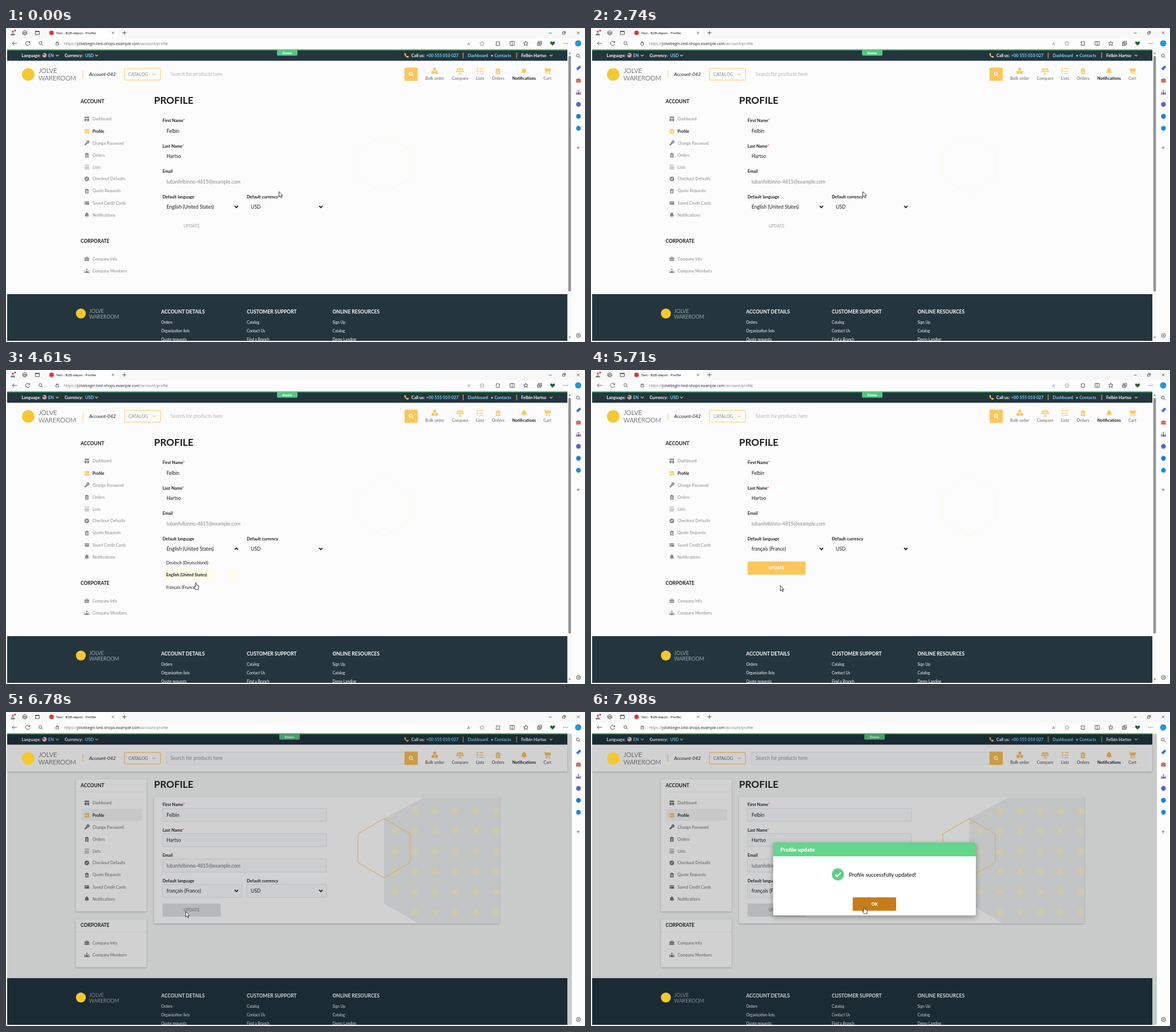
These frames come from a looping animation (1017x551 px, 8000 ms). An HTML page:

```html
<!DOCTYPE html>
<html lang="en">
<head>
<meta charset="utf-8">
<title>Profile</title>
<style>
html, body { margin: 0; width: 100%; height: 100%; overflow: hidden; background: #fdfdfd; }
svg {
  display: block; width: 100%; height: 100%;
  font-family: Lato, "Open Sans", sans-serif;
  --page: #fcfcfd; --bar: #24353e; --gold: #fdc65c; --ink: #1b1c1f; --mute: #88898b;
  --faint: #b4b5b8; --lit: #fff; --cyan: #80d4fb; --demo: #58c584; --line: #45b05c; --hex: #fdf9e6;
}
svg.dim {
  --page: #c9caca; --bar: #1b2b34; --gold: #cd9b42; --ink: #1c1d20; --mute: #5b5c5e;
  --faint: #77787a; --lit: #d4d6d6; --cyan: #67b0d2; --demo: #489e69; --line: #378c4a; --hex: #d3ad6c;
}
.page { fill: var(--page); } .bar { fill: var(--bar); } .gold { fill: var(--gold); }
.ink { fill: var(--ink); } .mute { fill: var(--mute); } .faint { fill: var(--faint); }
.lit { fill: var(--lit); } .cyan { fill: var(--cyan); } .demo { fill: var(--demo); }
.line { fill: var(--line); } .red { fill: #e0414c; } .white { fill: #fff; }
.goldline { fill: none; stroke: var(--gold); } .inkline { fill: none; stroke: var(--ink); }
.litline { fill: none; stroke: var(--lit); }
.chrome { fill: none; stroke: #333; stroke-width: .8; }
.b { font-weight: 700; } .h { font-weight: 900; } .i { font-style: italic; } .l { font-weight: 300; }
.ui { font-family: "Open Sans", "Noto Sans", sans-serif; }
.mid { text-anchor: middle; }
.shade { display: none; } .dim .shade { display: inline; } .dim .clear { display: none; }
.card { fill: #d1d1d2; filter: drop-shadow(0 1px 1.5px #0004); }
.box { fill: #cdcecf; stroke: #b7b8ba; stroke-width: .8; }
</style>
</head>
<body>
<svg id="stage" viewBox="0 0 1017 551" preserveAspectRatio="none"></svg>
<script>
const stage = document.getElementById('stage');

const text = (x, y, size, cls, s, id = '') =>
  `<text ${id && `id="${id}"`} x="${x}" y="${y}" font-size="${size}" class="${cls}">${s}</text>`;
const rect = (x, y, x2, y2, cls, r = 0, more = '') =>
  `<rect x="${x}" y="${y}" width="${x2 - x}" height="${y2 - y}" rx="${r}" class="${cls}" ${more}/>`;
const dot = (x, y, r, fill) => `<circle cx="${x}" cy="${y}" r="${r}" fill="${fill}"/>`;
const icon = (x, y, d, cls, scale = 1, more = '') =>
  `<path transform="translate(${x} ${y}) scale(${scale})" d="${d}" class="${cls}" fill-rule="evenodd" ${more}/>`;
const group = (id, s, more = '') => `<g id="${id}" ${more}>${s}</g>`;

const shapes = {
  board: 'M-4-4H4V-1.5H-4ZM-4-.5H-.5V4H-4ZM.5-.5H4V4H.5Z',
  badge: 'M-4-3H-2V-4H-1V-3H1V-4H2V-3H4V4H-4ZM-3-1H-1V2H-3ZM0-.5H3V.5H0ZM0 1.5H3V2.4H0Z',
  key: 'M-4 4V2L-.5-1.5A2.6 2.6 0 1 1 1.5.5L-1 3H-2V4ZM1.2-2.5H2.6V-1.2H1.2Z',
  clip: 'M-3-3H-1V-4H1V-3H3V4.4H-3ZM-1.8-1H1.8V-.2H-1.8ZM-1.8.7H1.8V1.5H-1.8ZM-1.8 2.4H1.8V3.2H-1.8Z',
  rows: 'M-4-4H4V-3.2H-4ZM-4-1.6H4V-.8H-4ZM-4 .8H4V1.6H-4ZM-4 3.2H4V4H-4Z',
  check: 'M-4 0A4 4 0 1 1 4 0A4 4 0 1 1-4 0ZM-2.2.1L-.6 1.8 2.4-1.2 1.7-1.9-.6.4-1.5-.6Z',
  credit: 'M-4-3H4V-1.6H-4ZM-4-.7H4V3H-4ZM-3 1.2H-1V2H-3Z',
  bell: 'M-4 2.5Q-2.8 1-2.8-1Q-2.6-3.4-.5-3.7V-4.4H.5V-3.7Q2.6-3.4 2.8-1Q2.8 1 4 2.5ZM-1.2 3.2H1.2L0 4.4Z',
  bag: 'M-4.2-2H-1.8V-3.8H1.8V-2H4.2V.5H-4.2ZM-1-2H1V-3H-1ZM-4.2 1.2H4.2V3.6H-4.2Z',
  people: 'M-1.3-2.4A1.3 1.3 0 1 1 1.3-2.4A1.3 1.3 0 1 1-1.3-2.4ZM-2 3.8V1Q0-1.4 2 1V3.8ZM-4.4 3.8V1.5L-2.6.8V3.8ZM4.4 3.8V1.5L2.6.8V3.8ZM-4-1H-2.5V.2H-4ZM2.5-1H4V.2H2.5Z',
  cubes: 'M-2-4L0-5 2-4V-1.3L0-.3-2-1.3ZM-4.6.4L-2.4-.4-.3.4V3.4L-2.4 4.3-4.6 3.4ZM.3.4L2.4-.4 4.6.4V3.4L2.4 4.3.3 3.4Z',
  scales: 'M0-4.5V4M-2.5 4H2.5M-4-3.2H4M-3.2-3L-5 .8H-1.4ZM3.2-3L1.4 .8H5Z',
  todo: 'M-1-3.5H5M-1 0H5M-1 3.5H5M-5-3.5L-4-2.6-2.5-4.6M-5 0L-4 .9-2.5-1.1M-5 3.3H-3.2',
  cart: 'M-5-4.5H-3.2L-2.9-3.5H5L4 .8H-2L-1.8 1.7H3.8V2.5H-2.5L-3.9-3.7H-5ZM-2 3H-.4V4.6H-2ZM2.2 3H3.8V4.6H2.2Z',
  lens: 'M1.3 1.3L3.8 3.8M-3.2-.6A2.6 2.6 0 1 1 2-.6A2.6 2.6 0 1 1-3.2-.6Z',
  phone: 'M-3.5-3.5L-1.8-4-.8-1.8-1.8-.9Q-1 .9.9 1.8L1.8.8 4 1.8 3.5 3.5Q2.5 4.3.8 3.7-3 1.8-3.8-1.5-4-3-3.5-3.5Z',
  down: 'M-2.4-1.1L0 1.3 2.4-1.1',
  big: 'M-3-1.5L0 1.5 3-1.5',
  plus: 'M-3.5 0H3.5M0-3.5V3.5',
  cross: 'M-2.3-2.3L2.3 2.3M2.3-2.3L-2.3 2.3',
  gear: 'M-3.6 0A3.6 3.6 0 1 1 3.6 0A3.6 3.6 0 1 1-3.6 0ZM-1.3 0A1.3 1.3 0 1 1 1.3 0A1.3 1.3 0 1 1-1.3 0Z',
  star: 'M0-4L1.2-1.2 4-1 1.9.9 2.5 3.8 0 2.2-2.5 3.8-1.9.9-4-1-1.2-1.2Z',
  hexagon: 'M0-4L3.6-2V2L0 4-3.6 2V-2ZM-1.8-1H1.8V1.6H-1.8Z',
  arrow: 'M0 0V9.6L2.2 7.6 3.8 11 5.2 10.4 3.7 7.1H6.6Z',
  hand: 'M-1 1Q-1-.3 0-.3T1 1V4L4 4.7Q5.4 5.1 5.2 6.8L4.5 11.5H-.4L-3.4 7.6Q-3.3 6.2-2 6.8L-1 7.7Z'
};

function chrome() {
  const ring = 'M3.4-1.6A3.7 3.7 0 1 0 3.7.8M3.7-3.8V-1.3H1.2';
  const c = (x, y, d, s) => icon(x, y, d, 'chrome', s);
  return rect(0, 0, 1017, 17.5, '', 0, 'fill="#f8f8f9"') + rect(73, 1.5, 197, 18, 'white', 3)
    + dot(12, 6.5, 2, '#858585') + icon(12, 11, 'M-4 2Q-4-1.5 0-1.5T4 2Z', '', 1, 'fill="#858585"') + dot(16, 4.5, 1.5, '#cf2c36')
    + c(33, 8.5, shapes.hexagon) + c(55, 8.5, 'M-3.5-3H3.5V3.2H-3.5ZM-3.5-2H3.5') + dot(80, 8.5, 4, '#dd3a39')
    + text(88, 10.8, 6.1, 'ui', 'Test - B2B-depot - Profile') + c(188, 8.5, shapes.cross, .9) + c(208, 8.5, shapes.plus)
    + c(956, 9, 'M-2.5 0H2.5') + c(980, 8.5, 'M-2.4-1.3H1.3V2.4H-2.4ZM-1-2.5H2.5V1') + c(1005, 8.5, shapes.cross)
    + c(15, 27, 'M4.3 0H-4M-.8-3.3L-4 0-.8 3.3') + c(38, 27, ring) + c(61, 27, shapes.lens)
    + c(90, 27, 'M-2.6-1H2.6V3.2H-2.6ZM-1.4-1V-3H1.4V-1', .9)
    + `<text x="102" y="29.6" font-size="6.7" class="ui" fill="#77787a">https://<tspan fill="#222">jolvebegin-test-shops.example.com</tspan>/account/profile</text>`
    + text(810, 30, 8, 'ui mute', 'A<tspan dy="-3" font-size="4">»</tspan>') + icon(836, 27, shapes.star, 'chrome', 1, 'opacity=".5"')
    + c(864, 27, 'M-3.2-2.5H-1Q0-5 1-2.5H3V-.5Q.5 0 3 1.2V3.3H-3.2V1.2Q-1 0-3.2-.8Z')
    + c(889, 27, 'M-3.7-3.3H3.7V3.3H-3.7ZM0-4V4') + c(913, 27, shapes.star) + c(937, 27, 'M-3.5-1.5H2V3.6H-3.5ZM-1.5-1.5V-3.7H3.7V1.6H2M-2.5 1H1M-.7-.7V2.7')
    + icon(960, 27, 'M0 4L-4 0Q-4.7-3.6-2-3.6L0-2 2-3.6Q4.7-3.6 4 0Z', '', 1, 'fill="#23642f"')
    + [980, 983, 986].map(x => dot(x, 27, .7, '#333')).join('') + dot(1005, 27, 5.5, '#2496d8')
    + c(1005, 49, shapes.lens) + icon(1005.5, 70.5, 'M-4 1L1-4H4V-1L-1 4Z', '', 1, 'fill="#3577d4"')
    + icon(1005.5, 92, shapes.bag, '', 1, 'fill="#c8472f"') + icon(1005.5, 113, shapes.people, '', 1, 'fill="#6d5b98"')
    + dot(1005.5, 134, 4.2, '#5964cf') + dot(1005.5, 155, 4.2, '#1a80d2') + dot(1005.5, 176, 4.2, '#1b8ddb')
    + c(1005, 210, shapes.plus, .8) + c(1005.5, 539.5, shapes.gear);
}

function topBar() {
  const down = x => icon(x, 48, shapes.down, 'goldline', 1, 'stroke-width="1.2"');
  const t = (x, cls, s) => text(x, 50.5, 7.4, 'b ' + cls, s);
  return rect(2, 38, 986, 57.5, 'bar') + rect(2, 37.5, 986, 39.3, 'line')
    + t(27.5, 'lit', 'Language:') + dot(67.5, 47.7, 3.8, '#dfe2ea')
    + icon(67.5, 47.7, 'M-3.3-2H3.3M-3.8 0H3.8M-3.3 2H3.3', '', 1, 'stroke="#d8444e"')
    + rect(64.2, 45, 67.6, 48, '', 0, 'fill="#38588f"') + t(74, 'cyan', 'EN') + down(90)
    + t(103, 'lit', 'Currency:') + t(139, 'cyan', 'USD') + down(159)
    + group('demo', rect(476, 38, 512, 48.5, 'demo', 2) + text(494, 45.5, 6.2, 'h mid lit', 'Demo'))
    + icon(703.5, 48, shapes.phone, 'gold') + t(712, 'lit', 'Call us:') + t(738, 'cyan', '+00 555 010 027')
    + rect(802.5, 43, 803.5, 53, 'gold') + t(811, 'cyan', 'Dashboard') + t(851.5, 'cyan', '•') + t(858, 'cyan', 'Contacts')
    + rect(896.5, 43, 897.5, 53, 'gold') + t(905, 'lit', 'Felbin Hartso') + down(957.5);
}

function header() {
  const item = (x, name, label, cls, line) => icon(x, 75.5, shapes[name], line ? 'goldline' : 'gold', 1.25)
    + text(x, 90.5, 7.2, 'b mid ' + cls, label);
  return rect(2, 57.5, 986, 104.5, 'card shade')
    + dot(39, 81.5, 11, '#f5c92d') + text(57, 79.3, 11.5, 'l ink', 'JOLVE') + text(57, 91.6, 11.2, 'l ink', 'WAREROOM')
    + rect(134.5, 75, 135.5, 87.5, 'gold') + text(146, 84.3, 8.5, 'i ink', 'Account-042')
    + rect(208, 71, 271.3, 91.3, 'goldline', 1.5) + text(215, 83.8, 7.7, 'mute', 'CATALOG')
    + icon(260, 81, shapes.big, 'goldline', .9, 'stroke-width="1.3"')
    + rect(282, 70.5, 702, 92, 'box shade', 1.5) + text(289, 84.3, 8.5, 'faint', 'Search for products here')
    + rect(700, 69.5, 723.3, 92.7, 'gold', 1.5) + icon(711.5, 81, shapes.lens, 'litline', 1, 'stroke-width="1.4"')
    + item(753, 'cubes', 'Bulk order', 'mute') + item(797.5, 'scales', 'Compare', 'mute', 1)
    + item(832.7, 'todo', 'Lists', 'mute', 1) + item(864.3, 'clip', 'Orders', 'mute')
    + item(910, 'bell', 'Notifications', 'ink') + item(951, 'cart', 'Cart', 'mute');
}

function sidebar() {
  const row = (y, name, label) => {
    const on = label === 'Profile';
    return icon(142, y, shapes[name], on ? 'gold' : 'mute') + text(152, y + 2.5, 7.05, on ? 'b ink' : 'mute', label);
  };
  return rect(122.5, 118, 247, 350, 'card shade', 2) + rect(122.5, 364, 247, 448, 'card shade', 2)
    + rect(122.5, 139.8, 247, 140.5, 'shade', 0, 'fill="#bdbebf"') + rect(122.5, 385.5, 247, 386.2, 'shade', 0, 'fill="#bdbebf"')
    + rect(132, 170, 239, 191, 'shade', 2, 'fill="#c8c8c9"')
    + text(131, 131.8, 8.5, 'b ink', 'ACCOUNT') + text(131, 377.2, 8.5, 'b ink', 'CORPORATE')
    + row(159.5, 'board', 'Dashboard') + row(181, 'badge', 'Profile') + row(202, 'key', 'Change Password')
    + row(223, 'clip', 'Orders') + row(244.3, 'rows', 'Lists') + row(264.7, 'check', 'Checkout Defaults')
    + row(285.9, 'clip', 'Quote Requests') + row(307, 'credit', 'Saved Credit Cards') + row(328, 'bell', 'Notifications')
    + row(405, 'bag', 'Company Info') + row(426.2, 'people', 'Company Members');
}

function form() {
  const label = (x, y, s, star = '') => text(x, y, 7.4, 'b ink', s + (star && '<tspan class="red">*</tspan>'));
  const field = (x, y, x2) => rect(x, y, x2, y + 23, 'box shade', 1.5);
  let dots = '';
  for (let x = 683; x < 866; x += 35.4)
    for (let y = 173.5; y < 366; y += 35.5)
      if (y > 190 && y < 330 || x > 700) dots += dot(x, y, 9, 'url(#glow)');
  return text(260, 133, 17.2, 'b ink', 'PROFILE') + rect(260, 149, 866.5, 371, 'card shade', 2)
    + `<g class="shade"><path d="M866 150H733L664 187V336L722 370H866Z" fill="#c2c4c5"/>${dots}</g>`
    + '<path d="M664 187L710 214V264L664 291 618 264V214Z" fill="none" style="stroke:var(--hex)" stroke-width="1.2"/>'
    + label(275, 165, 'First Name', 1) + label(275, 209.5, 'Last Name', 1) + label(275, 254, 'Email')
    + label(275, 298.7, 'Default language') + label(423, 298.7, 'Default currency')
    + field(275, 169, 563) + field(275, 213.3, 563) + field(275, 258, 563) + field(275, 302.3, 414.5) + field(423, 302.3, 563)
    + group('names', text(282, 184, 8.5, '', 'Felbin') + text(282, 228.4, 8.5, '', 'Hartso'))
    + text(282, 272.8, 8.5, 'mute', 'lubanfelbinno-4815@example.com')
    + text(282, 317.2, 8.5, 'ink', '', 'lang') + text(430, 317.2, 8.5, 'ink', 'USD')
    + group('flip', icon(0, 0, shapes.big, 'inkline', 1, 'stroke-width="1.7"'))
    + icon(553, 313.7, shapes.big, 'inkline', 1, 'stroke-width="1.7"')
    + rect(275, 336, 377, 359.3, 'shade', 1.5, 'fill="#b6b8ba"') + rect(275, 336, 377, 359.3, '', 1.5, 'id="button"')
    + text(326, 350, 7.2, 'b mid', 'UPDATE', 'update')
    + '<circle id="spin" cx="326" cy="347.7" r="4.6" fill="none" stroke="#fff" stroke-width="1.6" stroke-dasharray="23 5.9"/>'
    + group('menu', rect(275, 326, 414, 393, 'page') + rect(276, 349, 368, 369.5, '', 0, 'fill="#fffde9"')
      + rect(389, 349, 408, 369.5, '', 0, 'fill="#fffde9"') + rect(288, 392, 402, 393, '', 0, 'fill="#fdfbea"')
      + text(281.5, 340.8, 7.4, 'ink', 'Deutsch (Deutschland)') + text(281.5, 362.2, 7.2, 'b ink', 'English (United States)')
      + text(281.5, 384, 7.4, 'ink', 'français (France)'));
}

function footer() {
  const column = (x, title, links) => text(x, 500.5, 8.5, 'b lit', title)
    + links.map((s, i) => text(x, 518.8 + i * 15, 6.6, 'lit', s)).join('');
  return rect(2, 467, 986, 549, 'bar') + dot(131.5, 501, 8.7, '#f5c92d')
    + text(146, 500, 9.1, 'l lit', 'JOLVE') + text(146, 509.6, 8.9, 'l lit', 'WAREROOM')
    + column(272.5, 'ACCOUNT DETAILS', ['Orders', 'Organization lists', 'Quote requests'])
    + column(423, 'CUSTOMER SUPPORT', ['Catalog', 'Contact Us', 'Find a Branch'])
    + column(573.5, 'ONLINE RESOURCES', ['Sign Up', 'Catalog', 'Demo Landing'])
    + rect(0, 549, 1017, 551, '', 0, 'fill="#fdfdfd"');
}

function scrollbar() {
  return `<g class="clear">${rect(986, 38, 994, 549, '', 0, 'fill="#fafafa"')}${rect(987.7, 49, 992.3, 462.5, '', 2.2, 'fill="#929395"')}
    <path d="M987.8 45.5L990 42.5 992.2 45.5ZM987.8 541.5L990 544.5 992.2 541.5Z" fill="#858688"/></g>`;
}

function dialog() {
  return group('dialog', rect(320, 229, 676, 357, 'white', 2, 'style="filter:drop-shadow(0 3px 5px #0005)"')
    + '<path d="M320 253.3V231Q320 229 322 229H674Q676 229 676 231V253.3Z" fill="#63d58c"/>'
    + text(332.5, 244.6, 9.5, 'h white', 'Profile update')
    + group('tick', dot(433.7, 285, 10.7, '#5fd089') + '<path d="M429 285.2L432.3 288.5 438.7 282" fill="none" stroke="#fff" stroke-width="2.3"/>')
    + text(453, 288.6, 9.54, '', 'Profile successfully updated!')
    + rect(459.7, 325.3, 536, 348.8, '', 1.5, 'id="ok"') + text(498, 339.6, 7.4, 'h mid white', 'OK'));
}

stage.innerHTML = '<defs><radialGradient id="glow"><stop stop-color="#d2c99f"/><stop offset=".5" stop-color="#cdc8ad"/><stop offset="1" stop-color="#c2c4c5" stop-opacity="0"/></radialGradient></defs>'
  + chrome() + rect(2, 38, 994, 549, 'page', 3) + topBar() + header() + sidebar() + form() + footer() + scrollbar() + dialog()
  + '<path id="cursor" fill="#fff" stroke="#111" stroke-width=".8" stroke-linejoin="round"/>';

const el = Object.fromEntries([...stage.querySelectorAll('[id]')].map(e => [e.id, e]));
const show = (e, on) => e.style.display = on ? '' : 'none';

// Pointer stops: time, x, y
const route = [
  [0, 479.5, 287], [40, 479.5, 287], [840, 436, 519], [1250, 445, 521], [1670, 441, 520],
  [2110, 477.5, 287], [2740, 477.5, 287], [3420, 338, 314], [3940, 338, 314], [4610, 333.5, 373.5],
  [4770, 333, 377.5], [4810, 333, 379], [5640, 333, 379], [6300, 315.7, 350], [7310, 315.7, 350],
  [7850, 480, 342.5], [8000, 480, 342.5]
];

function pointer(t) {
  const n = route.findIndex(p => p[0] > t);
  const [a, x, y] = route[n - 1], [b, x2, y2] = route[n];
  const k = (t - a) / (b - a), e = k * k * (3 - 2 * k);
  return [x + (x2 - x) * e, y + (y2 - y) * e];
}

function draw(now) {
  const t = now % 8000;
  const [x, y] = pointer(t);
  const dim = t >= 6770, open = t >= 3450 && t < 5160;
  const saving = t >= 6470 && !dim, ready = t >= 5160 && !dim;
  const overUpdate = ready && !saving && y < 359;
  const overOk = dim && x > 459.7 && y < 348.8;

  stage.classList.toggle('dim', dim);
  el.demo.setAttribute('transform', `translate(${dim ? 4 : 0})`);
  el.names.setAttribute('class', saving ? 'mute' : 'ink');
  el.lang.textContent = t < 4980 ? 'English (United States)' : 'français (France)';
  el.flip.setAttribute('transform', `translate(404.7 313.7) scale(1 ${open ? -1 : 1})`);
  show(el.menu, open);
  show(el.button, ready);
  el.button.setAttribute('fill', overUpdate ? '#c67d17' : '#fdc65c');
  show(el.update, !saving);
  el.update.setAttribute('class', 'b mid ' + (ready ? 'white' : 'faint'));
  show(el.spin, saving);
  el.spin.setAttribute('transform', `rotate(${t * .36} 326 347.7)`);
  show(el.dialog, t >= 6800);
  el.dialog.setAttribute('opacity', Math.min(1, Math.max(0, (t - 6800) / 180)));
  show(el.tick, t >= 7310);
  el.ok.setAttribute('fill', overOk ? '#c67d17' : '#fdc65c');
  el.cursor.setAttribute('d', open || overUpdate || overOk ? shapes.hand : shapes.arrow);
  el.cursor.setAttribute('transform', `translate(${x} ${y})`);
}

const start = performance.now();
function tick(now) {
  draw(Math.max(0, now - start));
  requestAnimationFrame(tick);
}
draw(0);
requestAnimationFrame(tick);
</script>
</body>
</html>
```
